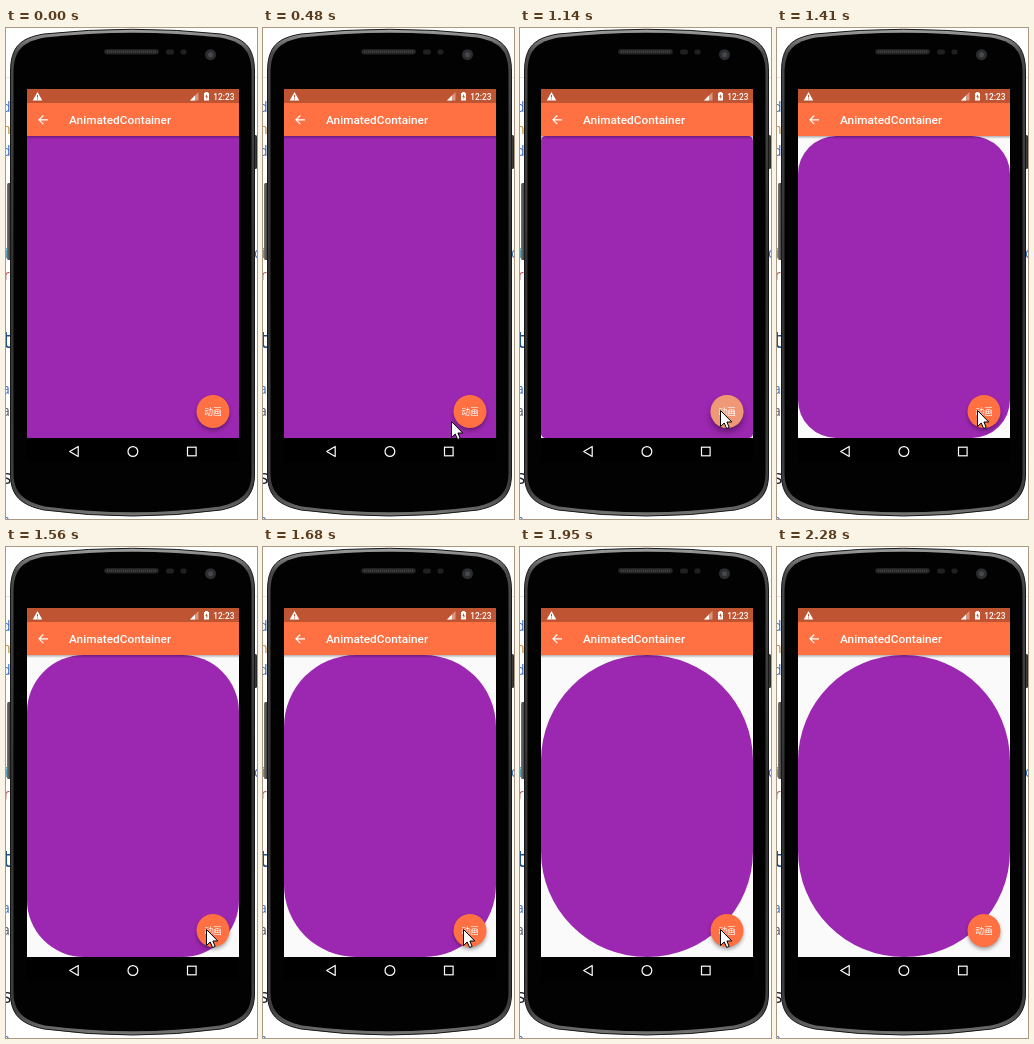
Recreate the animation shown at these times as an HTML page. Size 251 by 491 pixels, loop 2.79 s.

```html
<!DOCTYPE html>
<html lang="zh">
<head>
<meta charset="utf-8">
<title>AnimatedContainer</title>
<style>
html, body { margin: 0; width: 100%; height: 100%; overflow: hidden; background: #fff; }
svg { display: block; width: 251px; height: 491px; }
text { font-family: Roboto, sans-serif; }
.page text { font-family: "Open Sans", sans-serif; font-size: 14px; }
.cjk { font-family: "Noto Sans CJK SC", "Noto Sans CJK", sans-serif; }
</style>
</head>
<body>
<svg viewBox="0 0 251 491">
  <defs>
    <linearGradient id="rim" x2="0" y2="1">
      <stop offset="0" stop-color="#a0a0a0"/>
      <stop offset=".05" stop-color="#484848"/>
      <stop offset=".5" stop-color="#303030"/>
      <stop offset=".95" stop-color="#404040"/>
      <stop offset="1" stop-color="#777"/>
    </linearGradient>
    <linearGradient id="key">
      <stop offset="0" stop-color="#777"/>
      <stop offset="1" stop-color="#222"/>
    </linearGradient>
    <linearGradient id="drop" x2="0" y2="1">
      <stop offset="0" stop-opacity=".3"/>
      <stop offset="1" stop-opacity="0"/>
    </linearGradient>
    <filter id="soft" x="-50%" y="-50%" width="200%" height="200%"><feGaussianBlur id="blur" stdDeviation="2"/></filter>
    <clipPath id="screen"><rect x="21" y="61" width="212" height="373"/></clipPath>
    <clipPath id="fab"><circle cx="207" cy="383.500" r="16.500"/></clipPath>
  </defs>

  <rect width="251" height="491" fill="#fff"/>
  <path d="M0 49.500H251" stroke="#e4e6e8"/>
  <g class="page">
    <text x="-4" y="84" fill="#3f6fc0">d</text>
    <text x="-4" y="106" fill="#b98a2e">n</text>
    <text x="-4" y="128" fill="#3f6fc0">d</text>
    <text x="-1" y="230" fill="#2b8fa8">i</text>
    <text x="-2" y="252" fill="#b04a4a">r</text>
    <text x="-3" y="320" fill="#1c4f87" style="font-size:23px">t</text>
    <text x="-4" y="366" fill="#3f6fc0">a</text>
    <text x="-4" y="388" fill="#556">a</text>
    <text x="-4" y="456" fill="#223" style="font-size:20px">s</text>
    <text x="-4" y="497" fill="#3f6fc0">a</text>
    <text x="248" y="230" fill="#3f6fc0">d</text>
  </g>

  <rect x="1" y="155" width="5" height="77" rx="1.500" fill="url(#key)"/>
  <rect x="246" y="107" width="5" height="34" rx="1.500" fill="url(#key)"/>
  <path d="M4.500 44C4.500 18 15 10 38 6Q126.500 -3.500 215 6C238 10 248.500 18 248.500 44V446C248.500 468 238 477 215 482Q126.500 494 38 482C15 477 4.500 468 4.500 446Z" fill="url(#rim)" stroke="#161616"/>
  <path d="M7.500 45C7.500 21 18 13.500 39 9.500Q126.500 0 214 9.500C235 13.500 245.500 21 245.500 45V445C245.500 465 235 473.500 214 478.500Q126.500 490 39 478.500C18 473.500 7.500 465 7.500 445Z" fill="#020202"/>
  <rect x="98.500" y="21.500" width="54" height="4.500" rx="2.200" fill="#292929" stroke="#202020"/>
  <path d="M101 23.700H150" stroke="#424242" stroke-width="2" stroke-dasharray="1 1"/>
  <g fill="#202020">
    <rect x="160" y="21.500" width="8" height="5" rx="2"/>
    <rect x="174.500" y="21.500" width="6" height="5" rx="2"/>
  </g>
  <circle cx="204.500" cy="26.700" r="5.500" fill="#2b2d30"/>
  <circle cx="204.500" cy="26.700" r="2.500" fill="#46484c"/>

  <g clip-path="url(#screen)">
    <rect x="21" y="108" width="212" height="302" fill="#fafafa"/>
    <rect id="box" x="21" y="108" width="212" height="302" fill="#9c27b0"/>
    <rect x="21" y="61" width="212" height="14" fill="#bf5432"/>
    <rect x="21" y="75" width="212" height="33" fill="#ff7043"/>
    <rect x="21" y="108" width="212" height="3" fill="url(#drop)"/>
    <rect x="21" y="410" width="212" height="24" fill="#000"/>

    <g fill="#fff">
      <path d="M31.500 64L36.300 72.500H26.700Z"/>
      <path d="M31.500 67V69.500M31.500 70.500V71.500" stroke="#bf5432"/>
      <path d="M184 72.500L192.500 64V72.500Z" opacity=".4"/>
      <path d="M184 72.500L189 67.500V72.500Z"/>
      <path d="M198 65H199.200V64H201.800V65H203V72.500H198Z"/>
      <path d="M201 66L199.300 69H200.500V71.500L202 68.500H201Z" fill="#bf5432"/>
      <text x="207.300" y="71.700" font-size="8.300" font-weight="500">12:23</text>
      <text x="63" y="96" font-size="11.800" font-weight="500">AnimatedContainer</text>
    </g>
    <g fill="none" stroke="#fff" stroke-width="1.200">
      <path d="M42 91.800H33.300M37.300 87.500L33 91.800L37.300 96.100"/>
      <path d="M72.200 418.500V428.500L63.700 423.500Z" stroke-linejoin="round"/>
      <circle cx="126.900" cy="423.500" r="4.900"/>
      <rect x="181.500" y="419.200" width="8.600" height="8.600"/>
    </g>

    <circle id="shade" cx="207" cy="386" r="16" opacity=".4" filter="url(#soft)"/>
    <circle cx="207" cy="383.500" r="16.500" fill="#ff7043"/>
    <g clip-path="url(#fab)"><circle id="ripple" cx="204" cy="383" fill="#ddc2ae"/></g>
    <text class="cjk" x="207" y="386.800" font-size="8.800" font-weight="500" fill="#fff" text-anchor="middle">动画</text>
  </g>

  <path id="cursor" d="M.5 .5V16.500L4.200 13L6.700 18.500L9.200 17.400L6.900 12H11.800Z" fill="#fff" stroke="#000" stroke-width="1"/>
</svg>
<script>
const LOOP = 2790, TICK = 30;
const $ = id => document.getElementById(id);
const box = $('box'), ripple = $('ripple'), shade = $('shade'), blur = $('blur'), cursor = $('cursor');

// time, x, y of the pointer tip
const path = [
  [180, 246, 227], [240, 229, 275], [300, 213, 323], [360, 200, 360],
  [420, 191, 384], [480, 188, 393], [660, 188, 393], [780, 200, 382],
  [2160, 200, 382], [2190, 206, 372], [2220, 222, 346], [2250, 243, 304], [2280, 262, 265]
];
// time, splash radius, splash opacity, button lift
const press = [
  [990, 0, 0, 0], [1020, 5, .45, .3], [1140, 21, .48, 1],
  [1170, 23, .38, .8], [1290, 25, 0, 0]
];

function sample(rows, t) {
  if (t <= rows[0][0]) return rows[0].slice(1);
  const i = rows.findIndex(r => r[0] > t);
  if (i < 0) return rows[rows.length - 1].slice(1);
  const a = rows[i - 1], b = rows[i], u = (t - a[0]) / (b[0] - a[0]);
  return a.slice(1).map((v, k) => v + (b[k + 1] - v) * u);
}

function draw(now) {
  const t = Math.floor(now % LOOP / TICK) * TICK;

  box.setAttribute('rx', Math.min(106, Math.max(0, (t - 1104) / 8)));

  const [radius, alpha, lift] = sample(press, t);
  ripple.setAttribute('r', radius);
  ripple.setAttribute('opacity', alpha);
  shade.setAttribute('cy', 386 + 2 * lift);
  blur.setAttribute('stdDeviation', 2 + lift);

  const [x, y] = sample(path, t);
  cursor.setAttribute('transform', `translate(${Math.round(x)} ${Math.round(y)})`);
  cursor.setAttribute('visibility', t >= 180 && t < 2280 ? 'visible' : 'hidden');
}

const start = performance.now();
function frame() {
  draw(performance.now() - start);
  requestAnimationFrame(frame);
}
frame();
</script>
</body>
</html>
```
